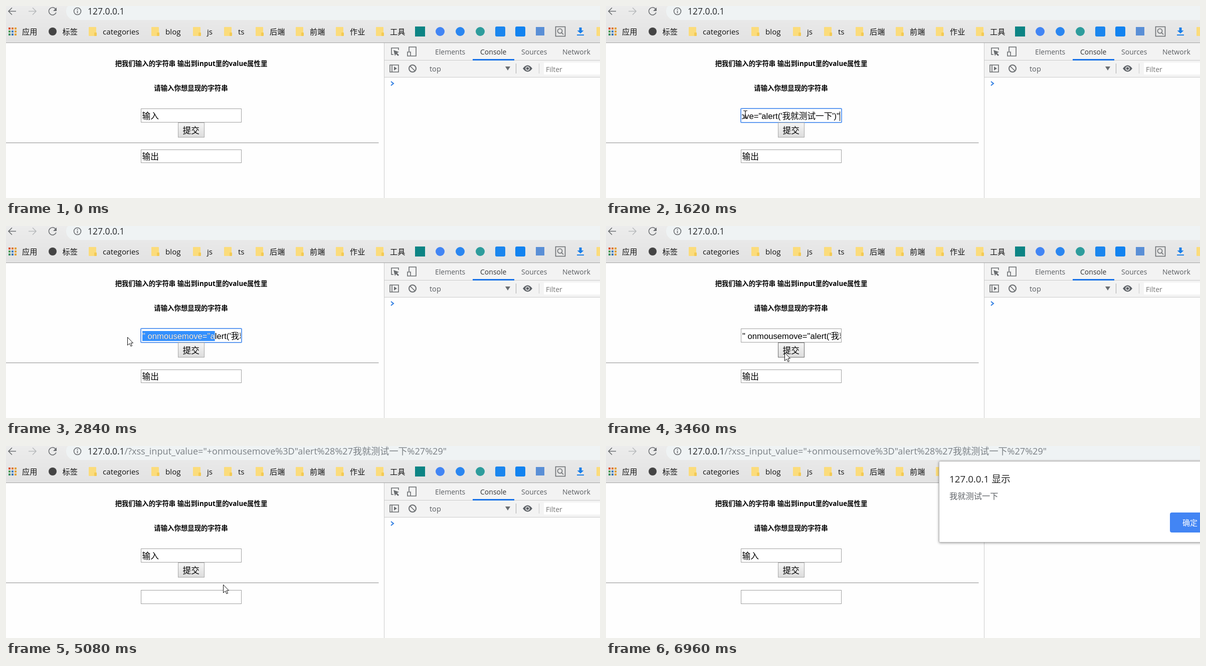
Recreate the animation shown at these times as an HTML page. Size 1185 px wide and 384 px high, loop 7.03 s.

```html
<!DOCTYPE html>
<html lang="zh">
<meta charset="utf-8">
<style>
  html, body { margin: 0; width: 100%; height: 100%; overflow: hidden; background: #fefefe; }
  svg { display: block; }
  text { font-family: "Open Sans", "Noto Sans CJK SC", "Noto Sans CJK", sans-serif; white-space: pre; }
  .mark { font-size: 15.2px; fill: #111; }
  .tool { font-size: 14px; fill: #5a5d61; }
  .head { font: bold 13.4px "Noto Sans", "Noto Sans CJK SC", "Noto Sans CJK", sans-serif; text-anchor: middle; }
  .field { font: 16.67px "Liberation Sans", "Noto Sans CJK SC", "Noto Sans CJK", sans-serif; }
  .box { fill: #fff; stroke: #a0a0a0; }
  .line { fill: none; stroke: #6a6d70; stroke-width: 1.6; }
</style>
<svg width="1185" height="384" viewBox="0 0 1185 384">
  <defs>
    <linearGradient id="bar" x2="0" y2="1"><stop stop-color="#ececec"/><stop offset="1" stop-color="#e3e3e3"/></linearGradient>
    <linearGradient id="face" x2="0" y2="1"><stop stop-color="#f5f5f5"/><stop offset="1" stop-color="#dcdcdc"/></linearGradient>
    <clipPath id="inside"><rect x="271" y="207" width="197" height="25"/></clipPath>
    <clipPath id="chosen"><rect id="chosenArea" y="210" height="20"/></clipPath>
    <filter id="shadow" x="-10%" y="-10%" width="120%" height="130%"><feDropShadow dx="0" dy="1" stdDeviation="2.5" flood-opacity=".4"/></filter>
  </defs>

  <!-- browser bars -->
  <rect width="1185" height="73" fill="url(#bar)"/>
  <rect x="120" y="-7" width="1200" height="35" rx="17.5" fill="#eff3f4"/>
  <path d="M0 73.5H1185" stroke="#a3a3a3"/>
  <g class="line" stroke-width="2">
    <path d="M20 10.500H5M12 3.500l-7 7 7 7"/>
    <path d="M45 10.500h15M53 3.500l7 7-7 7" stroke="#b8babc" style="stroke:#b8babc"/>
    <path d="M99 6a7.500 7.500 0 1 0 1 7"/>
    <circle cx="142.500" cy="10.500" r="7"/>
    <path d="M142.500 9.500v5M142.500 6v2"/>
  </g>
  <path d="M101 3v7h-7z" fill="#6a6d70"/>
  <text x="163" y="17" font-size="17.4" fill="#26282b">127.0.0.1</text>
  <text id="query" x="236.500" y="17" font-size="18.1" fill="#7b8085">/?xss_input_value="+onmousemove%3D"alert%28%27我就测试一下%27%29"</text>
  <g id="marks"></g>

  <!-- page -->
  <text class="head" x="369.500" y="120">把我们输入的字符串 输出到input里的value属性里</text>
  <text class="head" x="369" y="169">请输入你想显现的字符串</text>
  <rect class="box" x="269.500" y="205.500" width="200" height="27"/>
  <rect id="focus" x="269" y="205" width="201" height="28" rx="1.500" fill="none" stroke="#639df0" stroke-width="2"/>
  <g clip-path="url(#inside)">
    <rect id="highlight" y="210" height="20" fill="#3390ff"/>
    <text id="value" class="field" y="226"></text>
    <g clip-path="url(#chosen)"><text id="valueChosen" class="field" y="226" fill="#fff"></text></g>
    <path id="caret" d="M466.500 211v19" stroke="#000"/>
  </g>
  <rect id="button" x="343.500" y="233.500" width="52" height="29" fill="url(#face)"/>
  <text class="field" x="352.500" y="255">提交</text>
  <path d="M0 273.500H743.500" stroke="#9a9a9a"/>
  <path d="M0 274.500H743.500" stroke="#ededed"/>
  <rect id="output" class="box" x="269.500" width="200"/>
  <text id="outputText" class="field" x="271.500" y="307">输出</text>

  <!-- console panel -->
  <rect x="755" y="74" width="430" height="69" fill="#f3f3f3"/>
  <path d="M754.500 74V384M755 108.500h430M755 142.500h430M1063.500 115v20" stroke="#cbcbcb" fill="none"/>
  <path d="M1017.500 115v20" stroke="#aaa"/>
  <rect x="931" y="106" width="83" height="3" fill="#1a73e8"/>
  <rect x="1073" y="113" width="112" height="24" fill="#fff"/>
  <g class="tool">
    <text x="856" y="97">Elements</text><text x="946" y="97" fill="#333">Console</text>
    <text x="1028" y="97">Sources</text><text x="1110" y="97">Network</text>
    <text x="845" y="131" font-size="14.5">top</text><text x="1077" y="132" fill="#757575">Filter</text>
  </g>
  <g class="line">
    <path d="M773 97h-4V84h14v4M801 92h6v8h-6zM804 91v-9h14v18h-10M766 118h17v14h-17zM770 118v14"/>
    <circle cx="811" cy="125" r="7" stroke-width="2"/><path d="M806 120l10 10"/>
  </g>
  <path d="M773 88l11 4-4 2 4 4-2 2-4-4-2 4zM774 121l6 4-6 4zM996 121h10l-5 8z" fill="#6a6d70"/>
  <path d="M1031 125q9.500-13 19 0-9.500 13-19 0z" fill="#5f6368"/>
  <circle cx="1040.500" cy="125" r="3.500" fill="#5f6368" stroke="#f3f3f3" stroke-width="1.500"/>
  <path d="M768 151l5 4-5 4" fill="none" stroke="#2f7de1" stroke-width="2"/>

  <g id="dialog">
    <rect x="664.500" y="30.500" width="600" height="162" rx="2" fill="#fff" stroke="#b5b5b5" filter="url(#shadow)"/>
    <text x="685" y="73" font-size="18.75" fill="#222">127.0.0.1 显示</text>
    <text x="685" y="106" font-size="16.25" fill="#5f6368">我就测试一下</text>
    <rect id="confirm" x="1125" y="133" width="100" height="40" rx="4" stroke-width="2"/>
    <text x="1150" y="159" font-size="15" fill="#fff">确定</text>
  </g>
  <g id="cursor">
    <path id="arrow" d="M.5.500v16l4-3.500 2.500 5.500 2.500-1-2.500-5.500h4.500z" fill="#fff" stroke="#111"/>
    <path id="beam" d="M-4-7.500h3l1 1 1-1h3M0-6.500v13M-4 7.500h3l1-1 1 1h3" fill="none" stroke="#111" stroke-width="1.200"/>
  </g>
</svg>
<script>
const el = id => document.getElementById(id);
const set = (id, attrs) => { for (const k in attrs) el(id).setAttribute(k, attrs[k]); };
const show = (id, on) => set(id, { visibility: on ? 'inherit' : 'hidden' });

// Bookmarks
const rect = (x, y, w, h, fill, rx = 0) =>
  `<rect x="${x}" y="${y}" width="${w}" height="${h}" rx="${rx}" fill="${fill}"/>`;
const dot = (x, fill, r = 9) => `<circle cx="${x}" cy="51" r="${r}" fill="${fill}"/>`;
const label = (x, s) => `<text class="mark" x="${x}" y="57">${s}</text>`;
const folder = x => rect(x, 42, 15, 18, '#fbdc7c', 1) + rect(x + 11, 53, 5, 7, '#f3ca55', 1);
const folders = [[165, 'categories'], [290, 'blog'], [373, 'js'], [435, 'ts'],
  [498, '后端'], [578, '前端'], [658, '作业'], [738, '工具'], [1178, '']];
const gridColors = ['#d9532c', '#e0782c', '#e3a02f', '#4f9a52', '#3c7fc0', '#e0a030', '#3d9560', '#3b78b8', '#e0a030'];
el('marks').innerHTML =
  gridColors.map((c, i) => rect(5 + i % 3 * 6, 43 + Math.floor(i / 3) * 6, 4, 4, c)).join('') +
  label(32, '应用') + dot(93, '#444', 8) + label(112.5, '标签') +
  folders.map(([x, s]) => folder(x) + label(x + 28, s)).join('') +
  rect(816, 41, 20, 20, '#0c8484') + dot(866, '#4285f4') + dot(906, '#2a86f0') + dot(946, '#2d9c9c') +
  rect(976, 41, 20, 20, '#1b86ee', 3) + rect(1016, 41, 20, 20, '#1283f0', 3) + rect(1057, 42, 17, 17, '#5a8fd6') +
  '<path class="line" d="M1096.5 41.500h19v19h-19zM1108 53l4 4"/><circle class="line" cx="1105" cy="50" r="4.500"/>' +
  '<path d="M1143.500 43h5v6h4l-6.500 6-6.500-6h4zM1139 57h14v2h-14z" fill="#1a7fe8"/>';

// Pointer route: time, x, y
const route = [
  [70, 641, 336], [600, 342, 220], [770, 342, 220], [1100, 231, 220], [1460, 278, 217], [1620, 278, 217],
  [1850, 266, 243], [2150, 320, 222], [2240, 320, 222], [2690, 200, 222], [2770, 200, 222], [2849, 242, 222],
  [3210, 356, 253], [3530, 356, 253], [3690, 356, 255], [3927, 356, 255], [4080, 420, 266], [4610, 645, 137],
  [4690, 640, 145], [5082, 433, 277], [5220, 410, 296], [5390, 578, 211], [5470, 577, 211], [6000, 577, 211],
  [6470, 790, 240]];

function pointerAt(t) {
  const i = route.findIndex(p => p[0] > t);
  if (i < 1) return (i ? route.at(-1) : route[0]).slice(1);
  const [a, b] = [route[i - 1], route[i]];
  const k = (t - a[0]) / (b[0] - a[0]);
  return [a[1] + (b[1] - a[1]) * k, a[2] + (b[2] - a[2]) * k];
}

const PAYLOAD = '" onmousemove="alert(\'我就测试一下\')"';
const LOOP = 7030, STEP = 77, PASTE = 1530, RELOAD = 3690, ALERT = 5240;
const clamp = k => Math.max(0, Math.min(1, k));

function drawField(t, step, x) {
  const pasted = t >= PASTE && t < RELOAD;
  const focused = t >= 770 && t < 3380;
  const value = el('value');
  const text = pasted ? PAYLOAD : '输入';
  if (value.textContent !== text) value.textContent = el('valueChosen').textContent = text;

  let left = 271.5, from = 0, to = 0;
  if (pasted) {
    const end = 466 - value.getComputedTextLength();
    left = end + (272 - end) * clamp((step - 2400) / 290);
    if (focused && t >= 2240) {
      from = step < 2690 ? Math.max(272, x) : 272;
      to = left + value.getSubStringLength(0, 16);
    }
  } else if (focused) {
    const reach = pointerAt(Math.min(step, 1100))[0];
    from = reach > 297 ? 305 : reach > 280 ? 288 : 271.5;
    to = 305;
  }
  const area = { x: from, width: Math.max(0, to - from) };
  set('value', { x: left });
  set('valueChosen', { x: left });
  set('highlight', area);
  set('chosenArea', area);
  show('focus', focused);
  show('caret', t >= PASTE && t < 2240 && (t - PASTE) % 1060 < 530);
}

function draw() {
  const t = performance.now() % LOOP;
  const step = Math.floor((t + 10) / STEP) * STEP;
  const [x, y] = pointerAt(step);
  const reloaded = t >= RELOAD, alerted = t >= ALERT;
  const within = (left, top, w, h) => x >= left && x <= left + w && y >= top && y <= top + h;

  drawField(t, step, x);
  show('query', reloaded);
  show('outputText', !reloaded);
  set('output', reloaded ? { y: 288.5, height: 27 } : { y: 287.5, height: 26 });

  const hover = t >= 70 && !alerted && within(343, 233, 53, 30);
  set('button', { stroke: hover ? '#707070' : '#a8a8a8' });

  show('dialog', alerted);
  set('confirm', t < 6960 ? { fill: '#669df6', stroke: '#7eaaf3' } : { fill: '#4285f4', stroke: 'none' });

  const beam = alerted || within(269, 205, 201, 28) || within(269, 288, 201, 28);
  show('cursor', t >= 70 && t < 6470);
  set('cursor', { transform: `translate(${Math.round(x)} ${Math.round(y)})` });
  show('arrow', !beam);
  show('beam', beam);
  requestAnimationFrame(draw);
}
draw();
</script>
</html>
```
